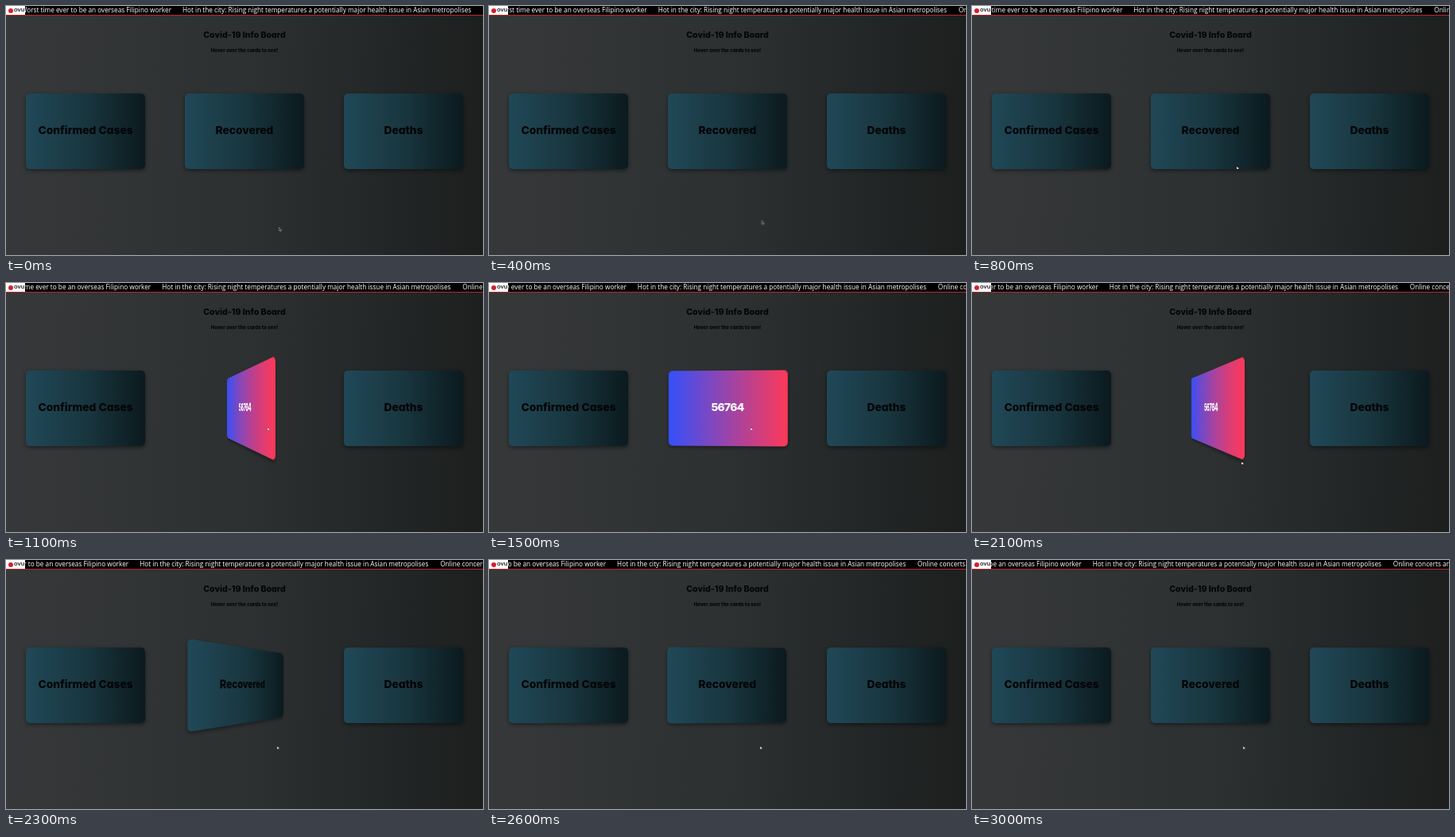
Write an HTML page that moves like this. It is 600 px wide and 313 px high and loops after 3100 ms.

```html
<!DOCTYPE html>
<html lang="en">
<head>
<meta charset="utf-8">
<title>Covid-19 Info Board</title>
<style>
  html, body { margin: 0; width: 100%; height: 100%; overflow: hidden; }
  .stage {
    position: relative; width: 600px; height: 313px; overflow: hidden;
    background: linear-gradient(92deg, #363839, #2d3031 52%, #1c1f1e);
    color: #040506; font: 800 13.8px/1 Inter, "Open Sans", sans-serif;
    font-feature-settings: "cv11" 1;
  }
  .stage > * { position: absolute; }
  .title, .hint { left: 0; width: 600px; text-align: center; }
  .title { top: 31.5px; font-size: 10.6px; }
  .hint { top: 53px; font-size: 6.1px; }

  .ticker {
    left: 0; top: 0; width: 600px; height: 11px; overflow: hidden;
    background: #000; border-bottom: 1px solid #b32a30;
    color: #fff; font: 500 8.24px/10px "Open Sans", "Noto Sans", sans-serif;
    white-space: nowrap;
  }
  .strip, .strip span { position: absolute; top: 0; }
  .strip { left: 0; }
  .logo {
    left: 0; top: 0; width: 24px; height: 11px; background: #fff;
    color: #222; font: 700 8px/9.5px Lato, sans-serif; text-indent: 10px;
  }
  .logo::before {
    content: ""; position: absolute; left: 3px; top: 2.5px;
    width: 6px; height: 6px; border-radius: 50%; background: #d3202f;
  }

  .slot { top: 110px; width: 150px; height: 94.5px; perspective: 248px; }
  .card, .face { position: absolute; inset: 0; }
  .card { transform-style: preserve-3d; }
  .face {
    border-radius: 5px; text-align: center; line-height: 92px;
    backface-visibility: hidden; box-shadow: 0 2px 5px rgba(0, 0, 0, .45);
  }
  .front { background: linear-gradient(90deg, #204857, #19363f 50%, #0b1a1e); }
  .back {
    background: linear-gradient(90deg, #3550fa, #fd3959);
    color: #fff; letter-spacing: -.7px; transform: rotateY(180deg);
  }

  .cursor { left: -2px; top: -2.5px; width: 5px; height: 6px; overflow: visible; }
</style>
</head>
<body>
<div class="stage">
  <div class="title">Covid-19 Info Board</div>
  <div class="hint">Hover over the cards to see!</div>
  <div class="slot" style="left:25px"><div class="face front">Confirmed Cases</div></div>
  <div class="slot" style="left:225px">
    <div class="card" id="card">
      <div class="face front">Recovered</div>
      <div class="face back">56764</div>
    </div>
  </div>
  <div class="slot" style="left:425px"><div class="face front">Deaths</div></div>
  <div class="ticker">
    <div class="strip" id="strip">
      <span style="right:-208px">Worst time ever to be an overseas Filipino worker</span>
      <span style="left:222px">Hot in the city: Rising night temperatures a potentially major health issue in Asian metropolises</span>
      <span style="left:600px">Online concerts and</span>
    </div>
  </div>
  <div class="logo">ovu</div>
  <svg class="cursor" id="cursor" viewBox="0 0 5 6">
    <path id="arrow" d="M.6 .4V4.6L1.6 3.8L2.3 5.3L3.1 4.9L2.5 3.5H3.8Z" fill="#111" stroke="#ccc" stroke-width=".5"/>
    <path id="hand" d="M1 1Q1.5 .7 1.8 1.2V1.9L3.4 2.3Q3.7 3.2 3.1 4H1.5L.6 2.8Q.6 2.2 1 2.3Z" fill="#fff" stroke="#222" stroke-width=".3"/>
  </svg>
</div>
<script>
  const LOOP = 3100, STEP = 100;
  const byId = id => document.getElementById(id);
  const tracks = [];

  // Each key is [ms, value, easing to the next key].
  function track(id, prop, keys, format = v => v) {
    const frames = keys.map(([ms, value, easing = 'linear']) =>
      ({ offset: ms / LOOP, [prop]: format(value), easing }));
    const anim = byId(id).animate(frames, { duration: LOOP, fill: 'both' });
    anim.pause();
    tracks.push(anim);
  }

  const shift = ([x, y]) => `translate(${x}px, ${y}px)`;
  const turn = deg => `rotateY(${deg}deg)`;

  track('strip', 'transform', [[0, [0, 0]], [LOOP, [-72.6, 0]]], shift);

  track('card', 'transform', [
    [0, 0], [812, 0, 'ease'], [1612, 180],
    [1916, 180, 'ease'], [2716, 0], [LOOP, 0]
  ], turn);

  track('cursor', 'transform', [
    [0, [345, 280]], [200, [345, 279]], [400, [344.5, 271.5]],
    [600, [341, 239]], [800, [334, 203]], [1000, [330, 184]], [1100, [330, 183]],
    [1500, [330, 183]], [1600, [331, 188]], [1800, [336.5, 212]],
    [1900, [337.5, 214.5]], [2100, [340, 226]], [2300, [342, 235.5]], [LOOP, [342, 235.5]]
  ], shift);

  const swap = 'steps(1, end)';
  track('arrow', 'opacity', [[0, 1, swap], [800, 0, swap], [LOOP, 0]]);
  track('hand', 'opacity', [[0, 0, swap], [800, 1, swap], [LOOP, 1]]);

  function draw() {
    const t = Math.floor(performance.now() % LOOP / STEP) * STEP;
    for (const anim of tracks) anim.currentTime = t;
    requestAnimationFrame(draw);
  }
  draw();
</script>
</body>
</html>
```
